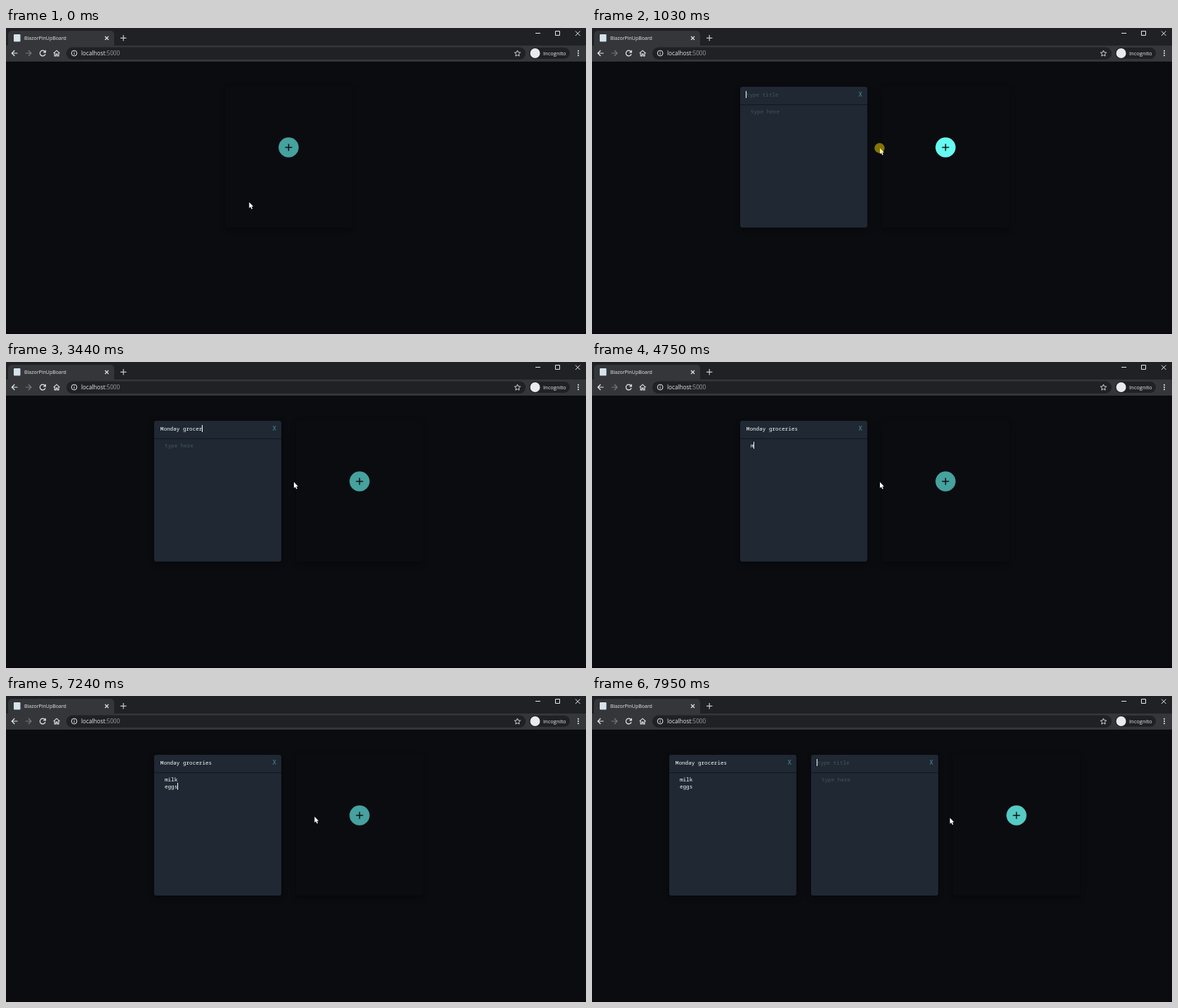
An HTML page with a canvas that plays this animation: 826x437 px, repeating every 8 s.

```html
<!DOCTYPE html>
<html lang="en">
<head>
<meta charset="utf-8">
<title>Pin-up board</title>
<style>
  html, body { margin: 0; width: 100%; height: 100%; overflow: hidden; background: #0b0c10; }
  canvas { display: block; }
</style>
</head>
<body>
<canvas id="stage" width="826" height="437"></canvas>
<script>
const ctx = document.getElementById('stage').getContext('2d');
const LOOP = 8000;
const SANS = '"Open Sans", "Noto Sans", sans-serif';
const MONO = '7.65px "Noto Sans Mono", "DejaVu Sans Mono", monospace';
const PITCH = 4.6, LINE = 9.7;
const TEAL = [69, 162, 158], BRIGHT = [102, 252, 241];

const TITLE = 'Monday groceries', BODY = 'milk\neggs';
const titleKeys = [1880, 2040, 2200, 2280, 2410, 2530, 2650, 2780, 2900,
                   2980, 3130, 3290, 3440, 3590, 3750, 3900];
const bodyKeys = [4750, 4920, 5060, 5200, 5340, 5470, 5770, 5930, 6080];
const FIRST_CARD = 1030, SECOND_CARD = 7870;

const clamp = v => Math.min(1, Math.max(0, v));
const progress = (t, start, length) => clamp((t - start) / length);
const smooth = p => p * p * (3 - 2 * p);
const easeOut = p => 1 - (1 - p) ** 2;
const within = (t, ...spans) => spans.some(([a, b]) => t >= a && t < b);
const typed = (text, keys, t) => text.slice(0, keys.filter(k => k <= t).length);

function rect(x, y, w, h, color, radius = 0) {
  ctx.fillStyle = color;
  ctx.beginPath();
  ctx.roundRect(x, y, w, h, radius);
  ctx.fill();
}

function disc(x, y, r, color) {
  ctx.fillStyle = color;
  ctx.beginPath();
  ctx.arc(x, y, r, 0, Math.PI * 2);
  ctx.fill();
}

function line(path, color, width = 1.2) {
  ctx.strokeStyle = color;
  ctx.lineWidth = width;
  ctx.stroke(new Path2D(path));
}

function label(text, x, y, color, font) {
  ctx.font = font;
  ctx.fillStyle = color;
  ctx.fillText(text, x, y);
}

function drawBrowser() {
  const light = '#e8eaed';
  rect(0, 0, 826, 25, '#202124');
  rect(3, 4, 151, 22, '#35363a', [5, 5, 0, 0]);
  rect(0, 25, 826, 23, '#35363a');
  rect(11, 9, 9.5, 10.5, '#d5e3ea', 1);
  label('BlazorPinUpBoard', 26, 17, light, '7px ' + SANS);
  line('M141 12l5 5m0-5l-5 5', light, 1.1);
  line('M163 14.3h8.4m-4.2-4.2v8.4', '#c9cbce', 1.2);
  line('M754 7.5h7', light, 1);
  line('M782.5 4.5h6v6h-6z', light, 1);
  line('M811 4.5l6.5 6.5m0-6.5l-6.5 6.5', light, 1);

  line('M16.5 36H8.3m4-4l-4 4l4 4', light);
  line('M27.7 36h8.2m-4-4l4 4l-4 4', '#77797d');
  line('M55.5 33.8A3.9 3.9 0 1 0 56 37.2M56.3 31.8v3h-3', light);
  line('M67.7 36.2l4.4-4l4.4 4M69.2 35.5v4.4h2v-2.8h1.8v2.8h2v-4.4', light, 1.1);

  rect(86, 27.5, 654, 17.5, '#202124', 9);
  line('M93.2 36a3.9 3.9 0 1 0 7.8 0a3.9 3.9 0 1 0-7.8 0M97.1 35.6v2.4M97.1 33.6v1', light, 1);
  label('localhost', 107, 39, light, '8.2px ' + SANS);
  const hostWidth = ctx.measureText('localhost').width;
  label(':5000', 107 + hostWidth, 39, '#9aa0a6', '8.2px ' + SANS);
  line('M728.4 32l1.2 2.8l3 .3l-2.2 2l.6 3l-2.6-1.5l-2.6 1.5l.6-3l-2.2-2l3-.3z', light, 0.9);

  rect(745, 28, 58, 16, '#202124', 8);
  disc(753.5, 36, 7, light);
  label('Incognito', 765, 38.7, light, '7.5px ' + SANS);
  for (const y of [32.7, 36, 39.3]) disc(815, y, 1.05, light);
}

function withShadow(draw) {
  ctx.save();
  ctx.shadowColor = 'rgba(0,0,0,.4)';
  ctx.shadowBlur = 8;
  ctx.shadowOffsetY = 3;
  draw();
  ctx.restore();
}

function drawCard(x, title, body, caret) {
  withShadow(() => rect(x, 84, 181, 201, '#1f2833', 3));
  rect(x, 109, 181, 1, '#12171e');
  label('X', x + 168.8, 98, '#45a29e', '8.6px ' + SANS);

  const hint = '#465758';
  const titleX = x + 8.8, bodyX = x + 14.9;
  label(title || 'type title', titleX, 97.9, title ? '#fff' : hint, MONO);
  const lines = body.split('\n');
  if (body) lines.forEach((text, i) => label(text, bodyX, 121.9 + i * LINE, '#fff', MONO));
  else label('type here', bodyX, 121.9, hint, MONO);

  if (caret === 'title') rect(Math.floor(titleX + title.length * PITCH), 90, 1, 10, '#fff');
  if (caret === 'body') {
    const row = lines.length - 1;
    rect(Math.floor(bodyX + lines[row].length * PITCH), 114 + row * 10, 1, 10, '#fff');
  }
}

function drawAddSlot(x, glow) {
  withShadow(() => rect(x, 84, 181, 201, '#0b0c10', 3));
  const color = TEAL.map((c, i) => Math.round(c + (BRIGHT[i] - c) * glow));
  const cx = x + 90.5;
  disc(cx, 170.5, 14.3, `rgb(${color})`);
  line(`M${cx - 5} 170.5h10m-5-5v10`, '#0b0c10', 1.5);
}

function drawPointer(x, y, isHand) {
  const shape = new Path2D(isHand
    ? 'M-1 1q1-1.6 2 0v3.3l4 .9q1 .3.8 1.5l-.8 3.8q-.2 1-1 1h-3.6q-.6 0-1.2-.8l-2.8-3.7q-.4-1 .8-1.1l1.8.9z'
    : 'M0 0v8.4l1.9-1.7l1.5 3.2l1.4-.7l-1.4-3h2.6z');
  ctx.save();
  ctx.translate(x, y);
  ctx.strokeStyle = '#000';
  ctx.lineWidth = 0.9;
  ctx.stroke(shape);
  ctx.fillStyle = '#fff';
  ctx.fill(shape);
  ctx.restore();
}

function drawClick(x, y, strength) {
  disc(x, y, 7.2, `rgba(255,225,0,${0.5 * strength})`);
}

function glowAt(t) {
  const fade = start => easeOut(progress(t, start, 250));
  return fade(310) - fade(FIRST_CARD) + fade(7340) - fade(SECOND_CARD);
}

function render(t) {
  rect(0, 0, 826, 437, '#0b0c10');
  rect(0, 435, 826, 2, '#0d060e');
  drawBrowser();

  const cardCount = (t >= FIRST_CARD) + (t >= SECOND_CARD);
  const left = 312 - 101 * cardCount;
  if (cardCount > 0) {
    const caret = within(t, [FIRST_CARD, 1580], [1880, 4130]) ? 'title'
      : within(t, [4750, 6630], [7160, 7690]) ? 'body' : '';
    drawCard(left, typed(TITLE, titleKeys, t), typed(BODY, bodyKeys, t), caret);
  }
  if (cardCount > 1) drawCard(left + 202, '', '', 'title');
  drawAddSlot(left + 202 * cardCount, glowAt(t));

  const first = smooth(progress(t, 70, 350));
  const second = smooth(progress(t, 7090, 420));
  const x = 346.3 + 63.7 * first + 99.7 * second;
  const y = 248.8 - 77.2 * first + 2.4 * second;
  drawPointer(x, y, within(t, [310, FIRST_CARD], [7340, 7780]));
  if (within(t, [940, 1120])) drawClick(409.5, 171.5, 1 - progress(t, 1030, 90));
}

function frame(now) {
  render(now % LOOP);
  requestAnimationFrame(frame);
}
requestAnimationFrame(frame);
</script>
</body>
</html>
```
